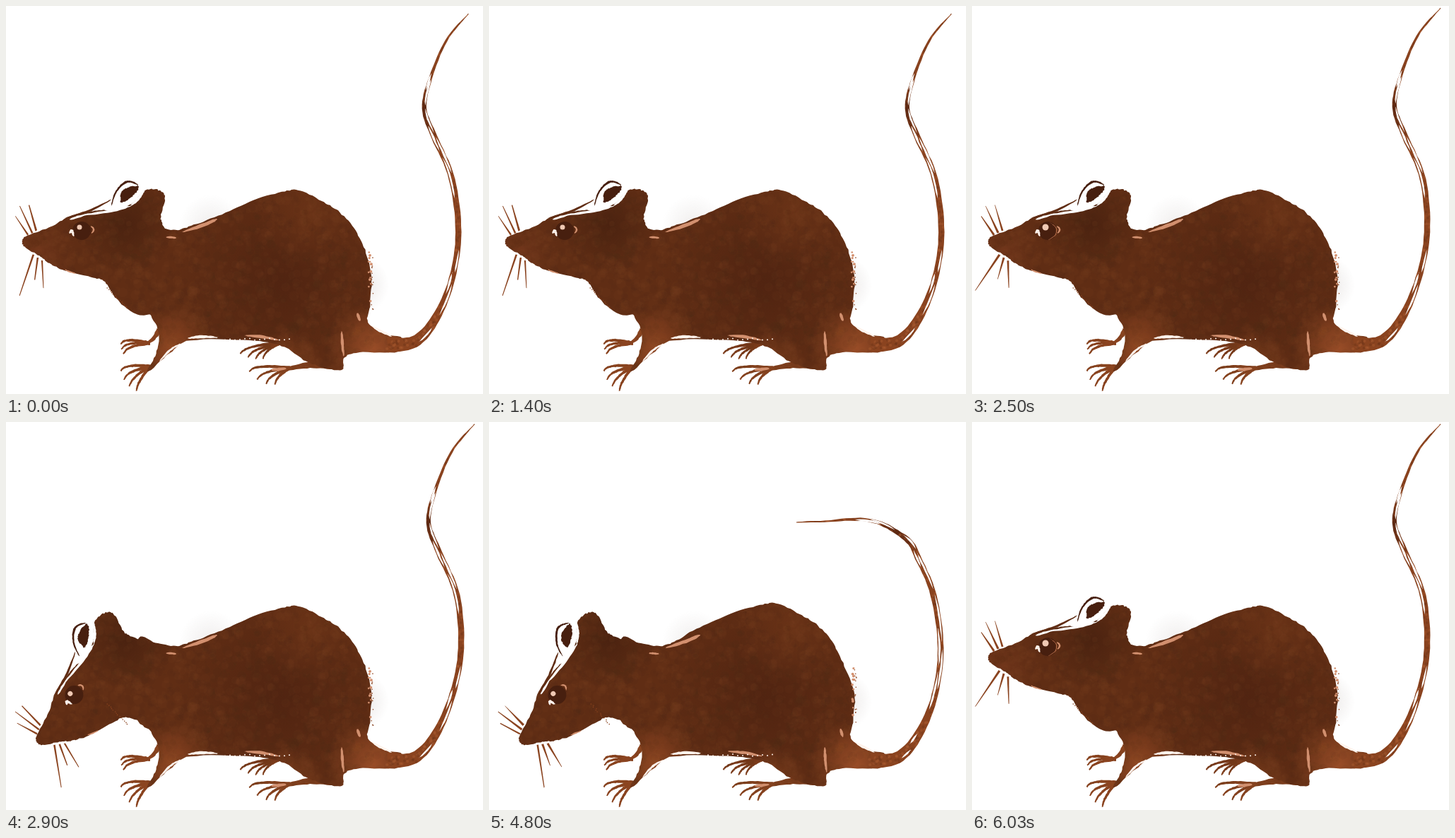
An HTML page with a canvas that plays this animation: 675 by 549 pixels, repeating every 6.23 s.

```html
<!DOCTYPE html>
<html lang="en">
<head>
<meta charset="utf-8">
<title>Rat</title>
<style>
html, body { margin: 0; height: 100%; overflow: hidden; background: #fff; }
canvas { display: block; }
</style>
</head>
<body>
<canvas id="stage" width="675" height="549"></canvas>
<script>
const ctx = document.getElementById('stage').getContext('2d');
const LOOP = 6230, STEPS = 8, RAD = Math.PI / 180;
const BROWN = '#602d14', DARK = '#471f0f', RUST = '#8a431f', PINK = '#d2906f', PALE = '#fff3ec';

// turn: degrees gained towards the tip; delay: where along the upper tail it begins
const tails = {
  rest: { lean: -7, length: .96, turn: 0, delay: 0 },
  high: { lean: 0, length: 1, turn: 0, delay: 0 },
  hook: { lean: 0, length: .8, turn: 55, delay: .65 },
  over: { lean: -9, length: .93, turn: -136, delay: .13 },
  swing: { lean: -3, length: 1, turn: -60, delay: .13 }
};
const poses = [
  [0, 'calm', 'rest'], [1000, 'alert', 'high'], [1200, 'calm', 'hook'], [1400, 'calm', 'rest'],
  [1600, 'alert', 'high'], [2100, 'calm', 'hook'], [2300, 'calm', 'high'], [2500, 'alert', 'high'],
  [2700, 'calm', 'high'], [2900, 'down', 'high'], [3900, 'calm', 'rest'], [4400, 'alert', 'high'],
  [4600, 'down', 'over'], [4800, 'arched', 'over'], [5800, 'arched', 'swing'],
  [6000, 'calm', 'rest'], [6030, 'alert', 'high']
];

const tailKeys = '540,479 578,475 608,442 632,385 644,320 638,245 613,185 598,143 607,98 630,43 663,3';
const bodyKeys = '185,311 212,312 240,317 262,311 300,297 345,277 390,263 417,261 450,278 470,290 ' +
  '492,314 508,345 517,385 515,425 512,447 535,464 560,470 555,489 500,490 478,498 476,514 455,513 ' +
  '425,503 390,481 345,473 262,473 232,491 200,518 211,495 217,468 205,438 183,412';
const headKeys = '222,309 219,298 225,272 219,262 204,259 192,264 180,278 160,288 135,289 110,292 ' +
  '85,300 60,314 28,326 23,334 28,342 45,352 60,363 80,373 120,384 140,390 157,415 190,437 235,420 235,345';

let seed;
const rand = () => (seed = (seed * 16807) % 2147483647) / 2147483647;
const clamp = v => Math.max(0, Math.min(1, v));
const parse = text => text.split(' ').map(p => p.split(',').map(Number));
const sliver = u => Math.sin(Math.PI * u) ** .6;
const taper = u => 1 - .65 * u;

// Catmull-Rom sampling
function smooth(points, closed) {
  const n = points.length, out = [];
  const at = i => closed ? points[(i + n) % n] : points[Math.max(0, Math.min(n - 1, i))];
  for (let i = 0; i < (closed ? n : n - 1); i++) {
    const [a, b, c, d] = [at(i - 1), at(i), at(i + 1), at(i + 2)];
    for (let s = 0; s < STEPS; s++) {
      const t = s / STEPS;
      out.push(b.map((v, k) => v + t / 2 * (c[k] - a[k] +
        t * (2 * a[k] - 5 * v + 4 * c[k] - d[k] + t * (3 * (v - c[k]) + d[k] - a[k])))));
    }
  }
  if (!closed) out.push(points[n - 1]);
  return out;
}

// Fills a polygon with a slightly ragged, hand-cut edge
function fill(points, color, rough = 1.4) {
  const jitter = () => (rand() - .5) * rough;
  ctx.fillStyle = color;
  ctx.beginPath();
  for (const [x, y] of points) ctx.lineTo(x + jitter(), y + jitter());
  ctx.fill();
}
const shape = (text, color) => fill(smooth(parse(text), true), color);

// Shifts [x, y, width] samples sideways by k widths
const side = (line, k) => line.map(([x, y, w], i) => {
  const a = line[Math.max(0, i - 1)], b = line[Math.min(line.length - 1, i + 1)];
  const dx = b[0] - a[0], dy = b[1] - a[1], len = Math.hypot(dx, dy) || 1;
  return [x - dy / len * w * k, y + dx / len * w * k];
});
function ribbon(line, color, width) {
  const wide = line.map(([x, y], i) => [x, y, width(i / (line.length - 1))]);
  fill([...side(wide, .5), ...side(wide, -.5).reverse()], color, .7);
  return wide;
}
const stroke = (text, color, w, profile = sliver) =>
  ribbon(smooth(parse(text)), color, u => w * profile(u));

function dot(x, y, r, color) {
  ctx.fillStyle = color;
  ctx.beginPath();
  ctx.arc(x, y, r, 0, 7);
  ctx.fill();
}

function glow(x, y, r, color) {
  const g = ctx.createRadialGradient(x, y, 0, x, y, r);
  g.addColorStop(0, color);
  g.addColorStop(1, color.slice(0, 7) + '00');
  dot(x, y, r, g);
}

// Walks up the tail, turning each piece further the nearer it is to the tip
function bendTail({ lean, length, turn, delay }) {
  const line = smooth(parse(tailKeys));
  const start = line.findIndex(p => p[1] < 210);
  let x, y;
  return line.map(([px, py], i) => {
    if (i <= start) return [x, y] = [px + lean * clamp((400 - py) / 150), py];
    const u = (i - start) / (line.length - start);
    const v = clamp((u - delay) / (1 - delay));
    const dx = px - line[i - 1][0], dy = py - line[i - 1][1];
    const angle = Math.atan2(dy, dx) + turn * RAD * (1 - (1 - v) ** 2);
    const step = Math.hypot(dx, dy) * length;
    return [x, y] = [x + step * Math.cos(angle), y + step * Math.sin(angle)];
  });
}

function drawTail(tail) {
  const line = ribbon(bendTail(tail), RUST,
    u => 1 + 7.5 * clamp((1 - u) * 2.6) + 14 * clamp(1 - u * 3) ** 1.5);
  if (tail.turn < -100) stroke('594,168 606,185 618,211', RUST, 5, taper);
  ctx.globalCompositeOperation = 'source-atop';
  const [x, y] = line[7 * STEPS];
  glow(x, y, 45, '#5c2812');
  for (let i = 0; i < 250; i++) {
    const [px, py] = line[Math.floor(rand() * line.length)];
    dot(px + rand() * 12 - 6, py + rand() * 12 - 6, 2, rand() < .5 ? '#4a1d0b33' : '#c0683a44');
  }
  ctx.globalCompositeOperation = 'source-over';
  for (let i = 9; i < 62; i += 4) {
    const cut = side(line, (i % 8 < 4 ? .22 : -.2)).slice(i, i + 4 + rand() * 5);
    if (rand() < .75) ribbon(cut, '#fff', u => 2.8 * sliver(u));
  }
}

// Toes fan out from one point; their tips hook downwards
function paw(x, y, from, to, first, last, count = 4) {
  for (let i = 0; i < count; i++) {
    const u = i / (count - 1), a = (from + (to - from) * u) * RAD, len = first + (last - first) * u;
    const at = (k, drop) => [x + Math.cos(a) * len * k, y + Math.sin(a) * len * k + drop];
    ribbon(smooth([at(0, 0), at(.5, -3), at(.85, -2), at(1, 3)]), RUST, v => 5 * taper(v));
  }
}

function drawFeet() {
  stroke('217,458 209,470 198,479', RUST, 8, taper);
  paw(204, 477, 182, 162, 42, 40, 3);
  paw(204, 510, 175, 122, 42, 37);
  stroke('398,474 384,477 366,484', '#753519', 9, taper);
  paw(388, 477, 168, 142, 58, 31);
  stroke('465,508 430,508 395,514', '#7a3b1b', 13, taper);
  paw(402, 512, 178, 136, 58, 30);
}

function drawTexture() {
  ctx.globalCompositeOperation = 'source-atop';
  glow(390, 390, 150, '#512411');
  glow(170, 310, 70, '#46200fcc');
  glow(430, 290, 80, '#703618aa');
  glow(40, 350, 60, '#74371caa');
  glow(235, 485, 60, '#8d4522');
  glow(520, 484, 65, '#984c27');
  glow(395, 515, 55, '#85421f');
  for (let i = 0; i < 3500; i++) {
    dot(20 + rand() * 530, 250 + rand() * 285, 1 + rand() * 6, rand() < .5 ? '#2a0d040b' : '#a8582a09');
  }
  ctx.globalCompositeOperation = 'source-over';
}

function drawMarks() {
  stroke('249,320 282,309 299,301', PINK, 5);
  stroke('226,327 241,328', PINK, 3);
  stroke('475,460 476,478 478,496', PINK, 4);
  stroke('497,434 501,446', PINK, 4);
  stroke('338,466 362,468 387,473', PINK, 4);
  stroke('257,470 277,468 300,469', PALE, 4);
  stroke('247,478 232,487 217,503', PALE, 3);
  stroke('516,452 546,468', PALE, 3);
  stroke('375,515 397,513', PINK, 4);
  for (let i = 0; i < 14; i++) {
    dot(513 + rand() * 4, 345 + rand() * 75, 1 + rand(), PINK);
    dot(517 + rand() * 3, 345 + rand() * 85, .8, RUST);
    dot(143 + i * 2 + rand() * 3, 399 + i * 2.2, .8, RUST);
    dot(310 + i * 7, 470 + rand() * 3, 1, PALE);
  }
}

function whiskers(x, y, dx, dy, angle, spread, lengths) {
  lengths.forEach((len, i) => {
    const px = x + dx * i, py = y + dy * i, a = (angle + spread * i) * RAD;
    ribbon([[px, py], [px + len * Math.cos(a), py + len * Math.sin(a)]], RUST, u => 2.8 * taper(u));
  });
}

function drawFace(alert, droop) {
  stroke('84,300 117,290 149,274', BROWN, 3);
  stroke('149,283 155,264 168,250 178,249 188,254', DARK, 3);
  shape('163,265 172,257 187,255 184,264 175,272 163,278', DARK);
  stroke('108,296 148,290 177,283', '#fff', 4);
  stroke('176,283 187,273 196,260', '#fff', 4);
  stroke('90,302 113,295', '#fff', 3);
  stroke('83,373 99,379', PINK, 2);
  dot(107, 318, 13, DARK);
  stroke('90,322 93,318 96,326', PALE, 4);
  stroke('120,311 124,316 121,322', PINK, 2.5);
  if (alert) stroke('110,306 119,314 118,324 108,331', '#b16a47', 1.2);
  dot(104, 313, alert ? 4.5 : 3.5, '#efc9b4');
  whiskers(31, 324, 6, -3, 236 + droop, 9, [32, 42, 38]);
  whiskers(39, 352, 6, 4, (alert ? 124 : 109) + droop, alert ? -18 : -11, [61, 32, 39]);
}

// The head swings around the eye
function inHead(down, paint) {
  ctx.save();
  if (down) {
    ctx.translate(95, 386);
    ctx.rotate(-42 * RAD);
    ctx.translate(-106, -317);
  }
  paint();
  ctx.restore();
}

function draw([, head, tail]) {
  const arched = head === 'arched', down = arched || head === 'down';
  seed = 4711;
  ctx.clearRect(0, 0, 675, 549);
  drawFeet();
  const body = parse(bodyKeys).map(([x, y]) => arched && x > 280 && y < 350 ? [x - 7, y - 4] : [x, y]);
  fill(smooth(body, true), BROWN);
  inHead(down, () => shape(headKeys, BROWN));
  drawTexture();
  drawTail(tails[tail]);
  drawMarks();
  inHead(down, () => drawFace(head === 'alert', down ? 14 : 0));
  ctx.globalCompositeOperation = 'destination-over';
  glow(290, 312, 45, '#b8aeaa38');
  glow(500, 395, 42, '#b8aeaa50');
  ctx.globalCompositeOperation = 'source-over';
}

let shown;
function tick() {
  const now = performance.now() % LOOP;
  const pose = poses.findLast(p => p[0] <= now);
  if (pose !== shown) draw(shown = pose);
  requestAnimationFrame(tick);
}
tick();
</script>
</body>
</html>
```
